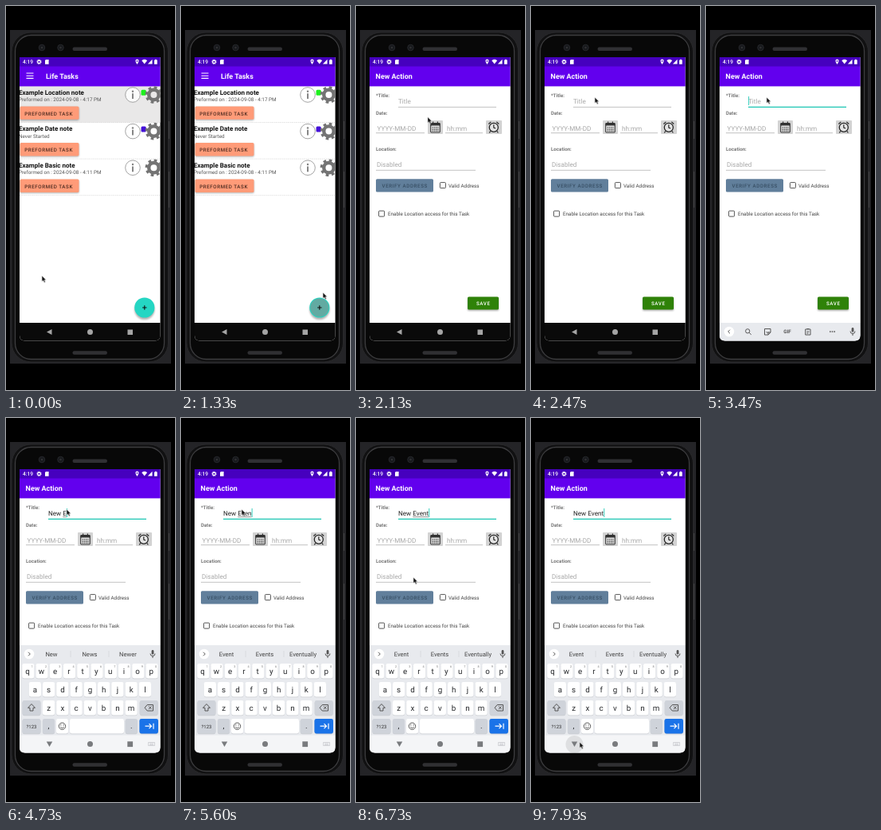
Recreate the animation shown at these times as an HTML page. Size 212 by 480 pixels, loop 8 s.

```html
<!DOCTYPE html>
<html lang="en">
<head>
<meta charset="utf-8">
<title>Life Tasks</title>
<style>
html, body { margin: 0; width: 100%; height: 100%; overflow: hidden; background: #000; }
svg { display: block; width: 100vw; height: 100vh; font-family: Roboto, sans-serif; }
text { white-space: pre; text-rendering: geometricPrecision; }
.bar { font-size: 8.96px; font-weight: 700; fill: #fff; }
.title { font-size: 8px; font-weight: 700; fill: #111; }
.note { font-size: 6.35px; fill: #555; }
.label { font-size: 6.2px; font-weight: 700; fill: #777; }
.field { font-size: 8.15px; fill: #a8a8a8; }
.check { font-size: 6.3px; fill: #444; }
.btn { font-size: 6.25px; font-weight: 500; letter-spacing: .56px; }
.mid { text-anchor: middle; }
.key { font-size: 9.8px; fill: #26282b; }
.tiny { font-size: 3.8px; fill: #777; }
.word { font-size: 7.6px; fill: #444; }
.line { fill: none; stroke: #555; stroke-width: 1; }
.glow, .form, .board, .press, .ripple, .cursor { animation: 8s linear infinite; }
.press, .ripple { transform-box: fill-box; transform-origin: center; }
.glow { animation-name: glow; }
.form { animation-name: form; }
.board { animation-name: board; }
.press { animation-name: press; }
.ripple { animation-name: ripple; }
.cursor { animation-name: cursor; }
@keyframes glow { 0%, .87% { opacity: 1; } 3.5%, 100% { opacity: 0; } }
@keyframes press {
  0%, 13.9% { opacity: 0; transform: scale(.3); }
  15.6%, 17.5% { opacity: 1; transform: scale(1); }
  21%, 100% { opacity: 0; transform: scale(1); }
}
@keyframes form {
  0%, 22.5% { opacity: 0; transform: translateY(26px); animation-timing-function: ease-out; }
  25.5%, 100% { opacity: 1; transform: none; }
}
@keyframes board {
  0%, 43.2% { transform: translateY(136px); animation-timing-function: ease-out; }
  44.9%, 100% { transform: none; }
}
@keyframes ripple {
  0%, 98.2% { opacity: 0; transform: scale(.5); }
  99%, 100% { opacity: 1; transform: none; }
}
@keyframes cursor {
  0%, .87% { transform: translate(45px, 337px); animation-timing-function: ease-in-out; }
  12%, 14.4% { transform: translate(173px, 375px); }
  16.6% { transform: translate(178px, 358px); animation-timing-function: ease-in-out; }
  29.5%, 34% { transform: translate(80px, 114px); }
  37.5%, 77.4% { transform: translate(76px, 114px); animation-timing-function: ease-in; }
  84.1% { transform: translate(72px, 198px); }
  87.5% { transform: translate(70px, 295px); animation-timing-function: ease-out; }
  95%, 100% { transform: translate(61px, 405px); }
}
</style>
</head>
<body>
<svg viewBox="0 0 212 480" preserveAspectRatio="none">
  <defs>
    <clipPath id="screen"><path d="M17 64H193.500V411.500Q193.500 418.500 186.500 418.500H24Q17 418.500 17 411.500Z"/></clipPath>
    <filter id="soft" x="-50%" y="-50%" width="200%" height="200%"><feGaussianBlur stdDeviation="1.1"/></filter>
    <g id="gear" fill="none">
      <circle r="6.2" stroke-width="4.4"/>
      <circle r="9" stroke-width="3.6" stroke-dasharray="3.534"/>
    </g>
    <g id="info">
      <circle r="9.3" fill="#fff" fill-opacity=".8" stroke="#999" stroke-width=".9"/>
      <circle cy="-4.2" r="1.2" fill="#808080"/>
      <path d="M0-1.8V5" stroke="#808080" stroke-width="1.9"/>
    </g>
  </defs>

  <rect width="212" height="480"/>
  <rect x="5" y="30" width="202" height="417" fill="#242427"/>
  <path d="M204 144V166M204 207V252" stroke="#4a4a4d" stroke-width="1.6"/>
  <rect x="7" y="33" width="196.500" height="412" rx="24" fill="#111112" stroke="#29292b"/>
  <rect x="11.500" y="36.500" width="187" height="405" rx="20" fill="#080808" stroke="#3d3d3f" stroke-width="1.3"/>
  <g fill="#17191c" stroke="#2b2d31" stroke-width=".8">
    <circle cx="45" cy="52" r="3.8"/><circle cx="68.500" cy="52" r="3.8"/>
  </g>
  <g fill="#303033">
    <circle cx="45" cy="52" r="1.3"/><circle cx="68.500" cy="52" r="1.3"/>
    <rect x="83.500" y="51.500" width="43.500" height="4.500" rx="2.200"/>
    <rect x="83.500" y="431.200" width="43.500" height="4.500" rx="2.200"/>
  </g>

  <g clip-path="url(#screen)">
    <rect x="17" y="64" width="177" height="355" fill="#fff"/>
    <rect class="glow" x="17" y="100" width="177" height="45.500" fill="#e9e8e8"/>
    <rect x="17" y="75" width="177" height="25.400" fill="#6200ee"/>
    <path d="M25.500 84H34.500M25.500 87.200H34.500M25.500 90.400H34.500" stroke="#fff" stroke-width="1.1"/>
    <text class="bar" x="50" y="91">Life Tasks</text>
    <g id="rows"></g>
    <circle cx="173.800" cy="379.500" r="12.6" fill="#000" opacity=".3" filter="url(#soft)"/>
    <circle cx="173.800" cy="377" r="12.6" fill="#25d6c3"/>
    <circle class="press" cx="173.800" cy="377" r="11.6" fill="#62aaa2"/>
    <path d="M171.100 377H176.500M173.800 374.300V379.700" stroke="#111" stroke-width="1.1"/>

    <g class="form">
      <rect x="17" y="75" width="177" height="323" fill="#fff"/>
      <rect x="17" y="75" width="177" height="25.400" fill="#6200ee"/>
      <text class="bar" x="24.600" y="91">New Action</text>
      <text class="label" x="25" y="114">*Title:</text>
      <text class="label" x="25" y="136.300">Date:</text>
      <text class="label" x="25" y="181.300">Location:</text>
      <path d="M53 126.400H176" stroke="#999" stroke-width=".6"/>
      <path d="M53 126.400H176" stroke="#20c9b6" stroke-width="1.1" data-show="2730-8000"/>
      <text class="field" x="53" y="122" data-show="0-3950">Title</text>
      <g id="typed"></g>
      <text class="field" x="26.500" y="155.500">YYYY-MM-DD</text>
      <text class="field" x="114" y="155.500">hh:mm</text>
      <text class="field" x="26" y="200.500">Disabled</text>
      <path d="M25 158.700H86M112 158.700H159M25 205.300H150" stroke="#999" stroke-width=".6"/>
      <rect x="90" y="143" width="19" height="17" rx="1" fill="#d3d3d3"/>
      <g transform="translate(99.500 151.700) scale(1.15)">
        <rect x="-5" y="-4.500" width="10" height="10" rx=".8" fill="#eee" stroke="#333"/>
        <path d="M-5-3H5" stroke="#333" stroke-width="2.2"/>
        <path d="M-3.300 0H3.500M-3.300 2H3.500M-3.300 3.900H3.500" stroke="#444" stroke-width="1.1" stroke-dasharray="1.2 .7"/>
        <path d="M-2.500-6.300V-3.500M2.500-6.300V-3.500" stroke="#333"/>
      </g>
      <rect x="163" y="143" width="20" height="17" rx="1" fill="#d3d3d3"/>
      <g transform="translate(172.800 151.800) scale(1.15)" fill="none" stroke="#222">
        <circle r="4.800" fill="#e4e4e4" stroke-width="1.1"/>
        <path d="M0-3V.3L2 1M-5.600-3.700L-3-6M5.600-3.700L3-6M-3.600 4.200L-4.800 5.800M3.600 4.200L4.800 5.800"/>
      </g>
      <rect x="25" y="216.200" width="72" height="16.400" rx="1.6" fill="#617f9b"/>
      <text class="btn mid" x="61.200" y="226.800" fill="#384f64">VERIFY ADDRESS</text>
      <rect class="line" x="105.400" y="220.600" width="7" height="7" rx=".8"/>
      <text class="check" x="116" y="227">Valid Address</text>
      <rect class="line" x="28.600" y="256.100" width="7" height="7" rx=".8"/>
      <text class="check" x="40" y="262">Enable Location access for this Task</text>
      <rect x="140" y="365" width="39" height="16" rx="1.6" opacity=".3" filter="url(#soft)"/>
      <rect x="140" y="363.500" width="39" height="16" rx="1.6" fill="#2f8208"/>
      <text class="btn mid" x="159.800" y="373.800" fill="#fff">SAVE</text>
    </g>

    <rect x="17" y="64" width="177" height="11.500" fill="#4600be"/>
    <text x="21" y="72.300" font-size="6.6" font-weight="500" fill="#fff">4:19</text>
    <use href="#gear" transform="translate(41.500 69.800) scale(.29)" stroke="#fff"/>
    <path d="M50 67H53.600V72.800H49V68Z" fill="#fff"/>
    <g fill="#fff" transform="translate(.7 0)">
      <path d="M163.800 73C161 69.400 161.300 66.600 163.800 66.600S166.600 69.400 163.800 73Z"/>
      <path d="M169.600 68.300Q173 65.400 176.400 68.300L173 72.600Z"/>
      <path d="M182.800 66.800V72.600H177.200Z"/>
      <path d="M185.300 67.400H186.300V66.700H188V67.400H189V72.800H185.300Z"/>
      <circle cx="163.800" cy="68.800" r=".9" fill="#4600be"/>
    </g>

    <rect x="17" y="396" width="177" height="23" fill="#0a0a0a"/>
    <g fill="#a5a5a5">
      <path d="M57.500 404V411L51 407.500Z"/>
      <circle cx="105.500" cy="407.500" r="3.500"/>
      <rect x="152.500" y="404.500" width="6.500" height="6.500"/>
    </g>

    <g class="board">
      <rect x="17" y="284" width="177" height="136" fill="#e8eaee"/>
      <rect x="17" y="396.500" width="177" height="24" fill="#f4f5f7"/>
      <circle cx="29" cy="295" r="6.300" fill="#fff"/>
      <g data-show="0-4130">
        <path class="line" d="M30 292.700L27.700 295L30 297.300"/>
        <circle class="line" cx="52.200" cy="294.300" r="2.600"/><path class="line" d="M54.200 296.300L56.700 298.800"/>
        <path class="line" d="M73.500 291.500H81V296L78 299H73.500ZM81 296H78V299M75.500 295.500Q77 297 78.500 295.500"/>
        <text class="mid" x="102" y="297.400" font-size="6.200" font-weight="700" fill="#555">GIF</text>
        <path class="line" d="M124.700 292H131V299H124.700ZM126.500 291.500H129.300M126.300 295H129.500M126.300 297H128.500"/>
        <path d="M155 295H162" stroke="#555" stroke-width="1.600" stroke-dasharray="1.600 1.100"/>
      </g>
      <path class="line" data-show="4130-8000" d="M28 292.700L30.300 295L28 297.300"/>
      <rect x="182.600" y="290" width="2.800" height="5.600" rx="1.400" fill="#555"/>
      <path class="line" d="M181 294.500Q181 297.500 184 297.500T187 294.500M184 297.500V300"/>
      <g id="words"></g>
      <g id="keys"></g>
      <circle class="ripple" cx="54.500" cy="408" r="11" fill="#dedfe1"/>
      <g fill="#797b7e">
        <path data-show="0-3730" d="M57.500 404V411L51 407.500Z"/>
        <path data-show="3730-8000" d="M50.800 404.500H58.200L54.500 411Z"/>
        <circle cx="105.500" cy="407.500" r="3.500"/>
        <rect x="152.300" y="404.300" width="6.800" height="6.800"/>
      </g>
      <path d="M178.500 405.500H186.500V409.500H178.500ZM180 407H185M180 408.400H185" fill="none" stroke="#c3c5c9" stroke-width=".7"/>
    </g>
  </g>

  <g class="cursor">
    <path transform="scale(.93)" d="M0 0V8L1.900 6.400L3.300 9.400L4.700 8.700L3.300 5.900H5.700Z" fill="#111" stroke="#fff" stroke-width=".5"/>
  </g>
</svg>

<script>
const LOOP = 8000;
const put = (id, html) => document.getElementById(id).innerHTML = html;
const range = (from, to) => `data-show="${from}-${to}"`;

const rows = [
  ['Example Location note', 'Preformed on : 2024-09-08 - 4:17 PM', '#1df01d'],
  ['Example Date note', 'Never Started', '#4410d8'],
  ['Example Basic note', 'Preformed on : 2024-09-08 - 4:11 PM', 'none'],
];
put('rows', rows.map(([title, note, tag], i) => `
  <g transform="translate(0 ${i * 45.6})">
    <text class="title" x="16" y="110.7">${title}</text>
    <text class="note" x="16" y="119.2">${note}</text>
    <rect x="17.5" y="126.5" width="74" height="16.4" rx="1.6" opacity=".3" filter="url(#soft)"/>
    <rect x="17.5" y="125.4" width="74" height="16.4" rx="1.6" fill="#ff9b78"/>
    <text class="btn" x="23.2" y="136.6" fill="#4a2a20">PREFORMED TASK</text>
    <use href="#info" x="159" y="111"/>
    <rect x="169.5" y="104.8" width="6.2" height="7" rx="1.5" fill="${tag}"/>
    <use href="#gear" x="185.4" y="111" stroke="#747474"/>
    <path d="M17 145.5H194" stroke="#ccc" stroke-width=".6" stroke-dasharray="1.5 1"/>
  </g>`).join(''));

// Keyboard
const cap = (x, y, w, fill = '#fff') =>
  `<rect x="${x - w / 2}" y="${y + .8}" width="${w}" height="18.4" rx="2.4" fill="#c9ccd1"/>
   <rect x="${x - w / 2}" y="${y}" width="${w}" height="18.4" rx="2.4" fill="${fill}"/>`;
const keyRow = (letters, x0, y, digits) => [...letters].map((c, i) => {
  const x = x0 + i * 17.25;
  return cap(x, y, 15.2) + `<text class="key mid" x="${x - (digits ? .7 : 0)}" y="${y + 12.6}">${c}</text>` +
    (digits ? `<text class="tiny mid" x="${x + 5}" y="${y + 5}">${(i + 1) % 10}</text>` : '');
}).join('');
const grey = '#cfd3da';
put('keys',
  keyRow('qwertyuiop', 27.8, 307, true) + keyRow('asdfghjkl', 36.4, 330) + keyRow('zxcvbnm', 53.6, 353) +
  cap(32, 353, 23, grey) + cap(179.2, 353, 23, grey) + cap(32, 376, 23, grey) +
  cap(53.5, 376, 15.2, grey) + cap(70.5, 376, 15.2) + cap(114, 376, 68) + cap(157.3, 376, 15.2, grey) +
  cap(179.2, 376, 23.6, '#1a73e8') + `
  <path class="line" d="M32 357.5L27.5 362.3H30V366H34V362.3H36.5Z"/>
  <path class="line" d="M174 362.2L177.2 358.5H184.5V366H177.2ZM179 360.4L182.5 364M182.5 360.4L179 364"/>
  <text class="mid" x="32" y="387.5" font-size="6" fill="#333">?123</text>
  <text class="key mid" x="53.5" y="388">,</text>
  <text class="key mid" x="157.3" y="388">.</text>
  <circle class="line" cx="70.5" cy="385.2" r="4.2"/>
  <path class="line" d="M68.8 383V384.4M72.2 383V384.4M68.3 386.3Q70.5 389 72.7 386.3"/>
  <path d="M174.5 385.2H182.5M179.5 382.2L182.5 385.2L179.5 388.2M185 381.7V388.7" fill="none" stroke="#fff" stroke-width="1.2"/>`);

const words = (list, from, to) => `<g ${range(from, to)}>` +
  list.map((w, i) => `<text class="word mid" x="${57 + i * 48}" y="297.6">${w}</text>`).join('') +
  '<path d="M81 291V299M129 291V299" stroke="#cdd0d5" stroke-width=".6"/></g>';
put('words', words(['New', 'News', 'Newer'], 4130, 4930) + words(['Event', 'Events', 'Eventually'], 4930, LOOP));

// Typed title with caret and composing underline
const typed = 'New Event';
const times = [3950, 4130, 4330, 4530, 4660, 4930, 5130, 5400, 5670];
put('typed', '<text class="field" style="fill:#222" x="53" y="122">' +
  [...typed].map((c, i) => `<tspan ${range(times[i], LOOP)}>${c}</tspan>`).join('') + '</text>');
const typedBox = document.getElementById('typed');
const line = typedBox.firstChild;
const endOf = i => line.getEndPositionOfChar(i).x;
const caret = (x, show) => `<rect x="${x + .2}" y="113" width=".9" height="11" fill="#20c9b6" data-show="${show}"/>`;
const wordStart = endOf(3);
let marks = caret(53, '3000-3950');
times.forEach((t, i) => {
  const last = i === times.length - 1, x = endOf(i);
  marks += caret(x, last ? '5670-6230 6730-7230 7730-8000' : `${t}-${times[i + 1]}`);
  if (i > 3) marks += `<path d="M${wordStart} 123.6H${x}" stroke="#444" stroke-width=".6" ${range(t, last ? 7870 : times[i + 1])}/>`;
});
typedBox.insertAdjacentHTML('beforeend', marks);

// Turn each data-show list of time spans into stepped keyframes
let css = '';
document.querySelectorAll('[data-show]').forEach((el, n) => {
  const steps = el.dataset.show.split(' ').map(span => {
    const [a, b] = span.split('-').map(ms => ms / LOOP * 100);
    return `${a}%{visibility:visible}` + (b < 100 ? `${b}%{visibility:hidden}` : '');
  });
  const lead = el.dataset.show.startsWith('0-') ? '' : '0%{visibility:hidden}';
  const tail = el.dataset.show.endsWith('-' + LOOP) ? 'visible' : 'hidden';
  css += `@keyframes show${n}{${lead}${steps.join('')}100%{visibility:${tail}}}`;
  el.style.animation = `show${n} ${LOOP}ms step-end infinite`;
});
document.head.insertAdjacentHTML('beforeend', `<style>${css}</style>`);
</script>
</body>
</html>
```
